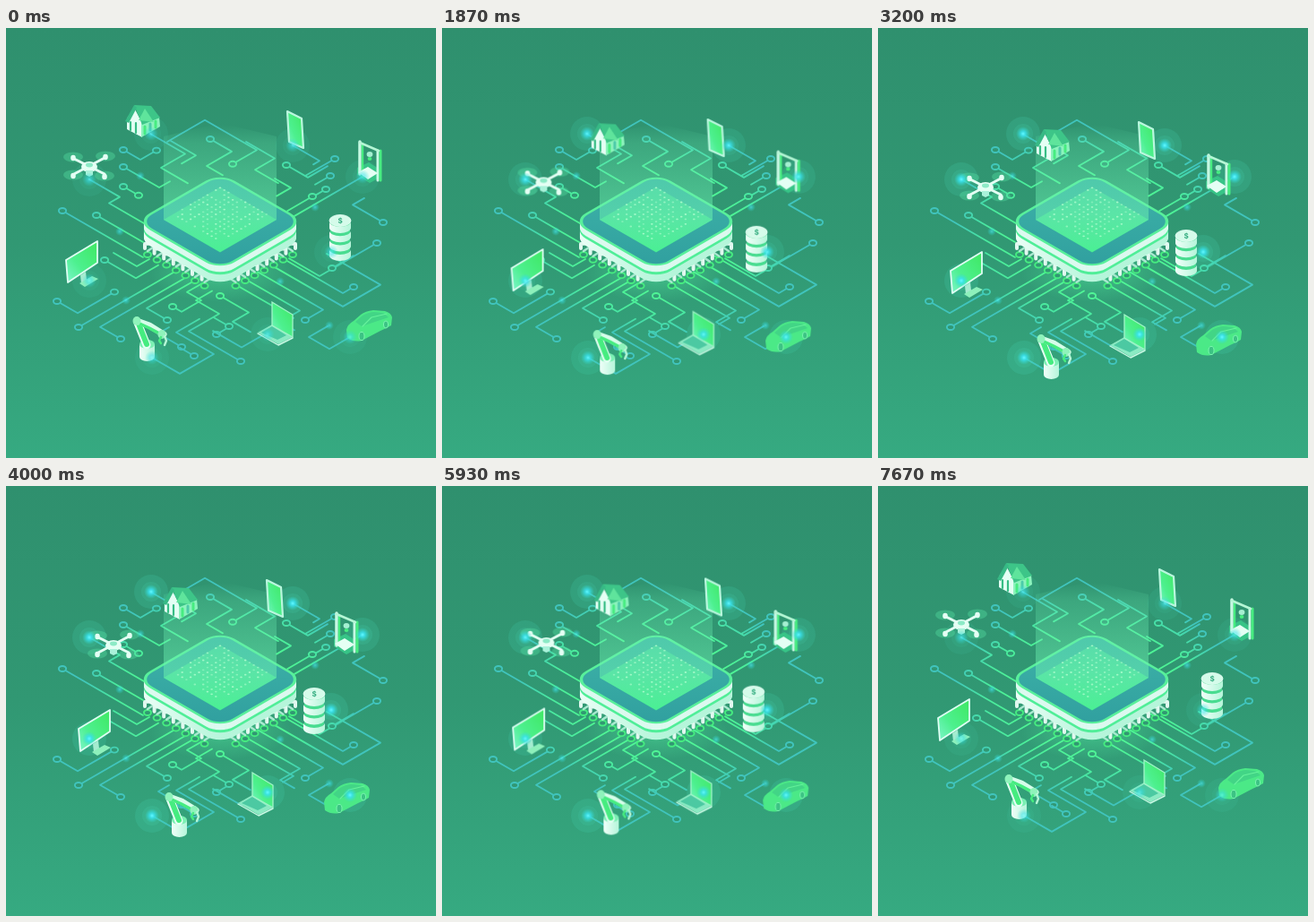
Write an HTML page that moves like this. It is 480 px wide and 480 px high and loops after 7740 ms.

```html
<!DOCTYPE html>
<html lang="en">
<head>
<meta charset="utf-8">
<title>Connected devices</title>
<style>
html, body { margin: 0; width: 100%; height: 100%; overflow: hidden; background: #319873; }
svg { display: block; width: 100vw; height: 100vh; }
.device, .pulse { animation: 7740ms infinite cubic-bezier(.37, 0, .63, 1); }
.device { animation-name: approach; }
.pulse { animation-name: pulse; }
@keyframes approach {
  0%, 12.92% { transform: translate(0, 0); }
  29.72%, 72.66% { transform: translate(var(--dx), var(--dy)); }
  89.46%, 100% { transform: translate(0, 0); }
}
@keyframes pulse {
  0%, 12.92% { opacity: .6; }
  29.72%, 72.66% { opacity: 1; }
  89.46%, 100% { opacity: .6; }
}
</style>
</head>
<body>
<svg id="stage" viewBox="0 0 480 480" preserveAspectRatio="none">
  <defs>
    <linearGradient id="sky" x2="0" y2="1">
      <stop stop-color="#2f906e"/><stop offset=".5" stop-color="#319873"/><stop offset="1" stop-color="#36aa81"/>
    </linearGradient>
    <radialGradient id="wire" gradientUnits="userSpaceOnUse" cx="0" cy="0" r="190" gradientTransform="translate(239 232) scale(1 .74)">
      <stop offset=".45" stop-color="#4ef593"/><stop offset=".62" stop-color="#4aea9f"/><stop offset=".82" stop-color="#40c4bd"/>
    </radialGradient>
    <linearGradient id="green" x1="0" y1="1" x2="1" y2="0">
      <stop stop-color="#7df5cc"/><stop offset=".4" stop-color="#4df08f"/><stop offset="1" stop-color="#3fe862"/>
    </linearGradient>
    <linearGradient id="white">
      <stop stop-color="#f0fff9"/><stop offset="1" stop-color="#b5f5da"/>
    </linearGradient>
    <linearGradient id="face" x2="1" y2="1">
      <stop stop-color="#3fb4a8"/><stop offset="1" stop-color="#309f9f"/>
    </linearGradient>
    <linearGradient id="screen" x2="1" y2="1">
      <stop stop-color="#52dca4"/><stop offset="1" stop-color="#48fa8c"/>
    </linearGradient>
    <linearGradient id="beam" gradientUnits="userSpaceOnUse" x1="0" y1="108" x2="0" y2="250">
      <stop stop-color="#6df0b4" stop-opacity="0"/><stop offset=".14" stop-color="#6df0b4" stop-opacity=".2"/>
      <stop offset=".7" stop-color="#6cf2b0" stop-opacity=".52"/><stop offset="1" stop-color="#50fa95" stop-opacity=".6"/>
    </linearGradient>
    <radialGradient id="spark">
      <stop stop-color="#62f8ff"/><stop offset=".35" stop-color="#38e0ec" stop-opacity=".85"/>
      <stop offset="1" stop-color="#35dcd0" stop-opacity="0"/>
    </radialGradient>
    <radialGradient id="glow">
      <stop stop-color="#5cffab" stop-opacity=".4"/><stop offset="1" stop-color="#5cffab" stop-opacity="0"/>
    </radialGradient>
  </defs>
  <rect width="480" height="480" fill="url(#sky)"/>
</svg>
<script>
const stage = document.getElementById('stage');
const MINT = '#e4fff4', LEAF = '#46ec80', SHADE = '#36bd84';

const poly = (points, fill, extra = '') => `<polygon points="${points}" fill="${fill}" ${extra}/>`;
const line = (points, color, width) =>
  `<polyline points="${points}" fill="none" stroke="${color}" stroke-width="${width}" stroke-linejoin="round" stroke-linecap="round"/>`;
const oval = (x, y, rx, ry, fill, extra = '') =>
  `<ellipse cx="${x}" cy="${y}" rx="${rx}" ry="${ry}" fill="${fill}" ${extra}/>`;
const ring = (x, y) => oval(x, y, 4.1, 3, '#319773', 'stroke="url(#wire)" stroke-width="1.9"');
const spark = (x, y, r, alpha = 1) => oval(x, y, r, r, 'url(#spark)', `opacity="${alpha}"`);

// Isometric traces: start point, then compass moves by horizontal distance.
// A leading "o" puts a ring on the start, a trailing "o" puts one on the end.
const COMPASS = { e: [1, -1], s: [1, 1], w: [-1, 1], n: [-1, -1] };
const SLOPE = .577;
function trace(route) {
  const [head, ...moves] = route.split(' ');
  let [x, y] = head.replace('o', '').split(',').map(Number);
  const points = [[x, y]];
  let rings = head[0] === 'o' ? ring(x, y) : '';
  for (const move of moves) {
    if (move === 'o') { rings += ring(x, y); continue; }
    const [sx, sy] = COMPASS[move[0]], length = +move.slice(1);
    x += sx * length;
    y += sy * length * SLOPE;
    points.push([x, y]);
  }
  return line(points.join(' '), 'url(#wire)', 1.8) + rings;
}

const topRoutes = [
  'o131,136 s19 e18 o', '161,118 s39 w27 s30', 'o228,124 s24 w28 s18',
  '180,127 e42 s58 w27 o', '184,126 s28 w16', '268,127 s32 w22 s26',
  'o313,153 s24 e22', '320,131 s30 w7', 'o367,146 w33', '300,168 s18 w16',
  'o362,165 w17', 'o357,180 w18', 'o342,188 w28', '398,166 w76',
  'o421,217 n34 e13'
];
const leftRoutes = [
  'o131,155 s40 e12', 'o131,177 s17 o', '93,169 s34 w12 s45',
  'o63,204 s90', 'o101,209 s52', 'o110,259 s35 e25', '120,251 s26 e14',
  'o57,305 s23 e41 o', 'o81,334 e110', 'o128,347 n23 e97', 'o180,326 n23 e56'
];
const rightRoutes = [
  'o414,240 w64 n34', 'o364,268 e24', '358,252 s60 w42 n78',
  'o388,289 w12 n73', 'o334,326 e20 n73', '384,345 w23 n23 e21'
];
const bottomRoutes = [
  'o186,311 s10 e22 n16 e18', 'o262,372 n58 e34 n26 e18',
  'o235,342 e15', 'o249,333 n17', 'o196,356 n26 e12', 'o210,366 n16',
  '163,368 s31 e38 n42 e26', 'o239,299 s32 w18 s20', '290,341 w27 n32',
  '259,288 s62 w12', '270,282 s58 w22 s16'
];
const wires = [...topRoutes, ...leftRoutes, ...rightRoutes, ...bottomRoutes].map(trace).join('');

const isoSquare = (y, half, radius, fill, extra = '') =>
  `<rect transform="matrix(.866 .5 -.866 .5 239 ${y})" x="${-half}" y="${-half}" width="${2 * half}" height="${2 * half}" rx="${radius}" fill="${fill}" ${extra}/>`;

function chip() {
  let out = oval(239, 272, 80, 34, 'url(#glow)');
  for (let i = 0; i < 7; i++) {
    for (const side of [-1, 1]) {
      const x = 239 + side * (81 - 10.6 * i), y = 253 + 5.8 * i;
      const at = (dx, dy) => `${x - side * dx},${y + dy}`;
      out += oval(x, y, 4, 3, '#319773', `stroke="${LEAF}" stroke-width="2"`);
      out += line(`${at(9, -13)} ${at(-3, -12)} ${at(-3, -7)}`, '#e2f8f0', 4);
      out += line(`${at(6, -8)} ${at(0, -4)}`, '#a8e8cf', 2.5);
    }
  }
  for (let dy = 18; dy > 0; dy--) {
    const color = dy > 10 ? 'url(#white)' : dy > 7 ? '#50ee98' : '#dcf9ef';
    out += isoSquare(216 + dy, 54.4, 18, color);
  }
  out += isoSquare(216, 53.2, 17, 'url(#face)', 'stroke="#58f09b" stroke-width="2.8"');
  out += isoSquare(214, 36.4, 0, 'url(#screen)', 'opacity=".7"');
  out += poly('176,121 239,106 302,121 302,214 239,250 176,214', 'url(#beam)');
  for (let u = -6; u <= 5; u++) {
    for (let v = -6; v <= 5; v++) {
      const noise = Math.abs(Math.sin(u * 12.99 + v * 78.23) * 43758.5) % 1;
      if (noise < .22) continue;
      const x = 239 + (u - v) * 4.7, y = 208 + (u + v + 1) * 2.7;
      out += oval(x, y, 1.3, .9, '#b8ffd2', `opacity="${.25 + noise * .55}"`);
    }
  }
  return out;
}

const house = () =>
  poly('135,101 143,89 152,106 152,122 135,113', MINT) +
  poly('151,106 171,99 172,110 151,122', '#8cf3bd') +
  poly('143,86 162,87 172,100 152,108', '#3dc588') +
  poly('133,104 143,86 146,89 137,106', '#37b985') +
  poly('148,103 155,90 165,105', '#5fe49c') +
  line('139,105 139,114', SHADE, 2.2) + line('145,106 145,117', SHADE, 2.2) +
  line('155,110 155,118', LEAF, 3) + line('161,107 161,114', '#4ccba9', 3) + line('167,104 167,111', LEAF, 3);

function drone() {
  const rotors = [[75, 144], [111, 143], [75, 164], [110, 165]];
  return rotors.map(([x, y]) => oval(x, y, 11, 5.5, '#55dfa2', 'opacity=".4"')).join('') +
    line('76,146 110,163', MINT, 3) + line('110,145 76,163', MINT, 3) +
    rotors.map(([x, y]) => oval(x, y + 1, 2.8, 3.2, MINT)).join('') +
    oval(93, 155, 9, 6, MINT) + oval(93, 153, 4, 2.4, '#8ceac6') +
    poly('89,159 97,159 97,164 93,166 89,164', '#a9f2da');
}

const monitor = () =>
  poly('83,276 89,272 90,281 84,285', '#a4ecd0') +
  poly('82,285 96,277 103,280 88,289', '#8df0bb') +
  poly('67,259 102,238 102,262 69,284', 'url(#green)', 'stroke="#dffff4" stroke-width="1.8" stroke-linejoin="round"');

const phone = () =>
  poly('314,93 330,101 332,134 316,127', 'url(#green)', 'stroke="#b9f7de" stroke-width="2.2" stroke-linejoin="round"');

const printer = () =>
  poly('392,156 405,150 419,159 419,166 406,173 392,164', '#37c487') +
  line('395,127 395,163', '#c7f8e3', 3.5) + line('415,137 415,170', '#c7f8e3', 3) +
  line('398,129 398,162', LEAF, 2.4) + line('418,137 418,170', LEAF, 3) +
  line('395,128 416,137', '#b5f6d5', 2.6) +
  poly('393,161 404,155 415,162 404,169', MINT) +
  oval(406, 141, 3.4, 3, '#a5efd1') + oval(406, 146, 2.4, 2, LEAF);

function coins() {
  let out = '<path d="M362 216v32a11 6 0 0 0 22 0v-32z" fill="#48dc90"/>';
  for (let row = 3; row >= 0; row--) {
    const y = 216 + row * 10.3;
    out += `<path d="M361 ${y}a12 6 0 0 0 24 0v7a12 6 0 0 1 -24 0z" fill="url(#white)"/>`;
  }
  out += oval(373, 215, 12, 6.5, '#d5fbea', 'stroke="#e9fff6" stroke-width=".8"');
  return out + '<text x="373" y="218" text-anchor="middle" font-family="Inter, sans-serif" font-weight="700" font-size="8" fill="#35ad80">$</text>';
}

const car = () =>
  '<path d="M380 337Q381 331 388 327L396 320Q401 316 410 315L423 316Q430 318 431 323L430 332Q425 335 418 338L397 349Q388 351 381 346Z" fill="#4be987"/>' +
  '<path d="M390 328L398 321Q405 317 411 317L421 318L427 323L409 329L397 333Z" fill="#42d586"/>' +
  line('398,333 408,323 425,319', '#66f29c', 1.2) +
  oval(397, 344, 3, 4.6, '#3cc384', 'stroke="#78f5ae" stroke-width="1"') +
  oval(424, 331, 2.6, 4, '#3cc384', 'stroke="#78f5ae" stroke-width="1"');

const laptop = () =>
  poly('281,340 297,331 320,345 304,353', '#8beac3') +
  poly('285,340 297,333 313,343 303,348', '#4cc9a2') +
  poly('297,306 320,320 320,345 297,332', 'url(#green)', 'stroke="#a0f5c8" stroke-width="1.3"') +
  line('281,341 304,354 320,346', '#c9f9e4', 1.4);

const robot = () =>
  '<path d="M149 353v14a8.5 5 0 0 0 17 0v-14z" fill="url(#white)"/>' +
  oval(157.5, 353, 8.5, 5, '#7cf0b4') +
  line('157,354 147,329', MINT, 9) + line('157,353 148,330', LEAF, 6) +
  line('146,327 160,332 176,342', '#d6fdea', 7) + line('147,329 160,335 173,342', LEAF, 3.5) +
  oval(146, 327, 4.5, 5, '#8ff3bb') + oval(174, 342, 4.5, 5, '#8ff3bb') +
  line('177,344 179,349 177,354', '#b5f7d6', 2.4) + line('173,345 171,349 173,352', LEAF, 2.4);

const devices = [
  { draw: house, dx: 42, dy: 27, node: [162, 118] },
  { draw: drone, dx: 27, dy: 23, node: [93, 169] },
  { draw: monitor, dx: 14, dy: 12, node: [93, 282] },
  { draw: phone, dx: -23, dy: 12, node: [320, 131] },
  { draw: printer, dx: -26, dy: 15, node: [398, 166] },
  { draw: coins, dx: -29, dy: 17, node: [363, 250] },
  { draw: car, dx: -25, dy: 16, node: [384, 345] },
  { draw: laptop, dx: -22, dy: 14, node: [292, 342] },
  { draw: robot, dx: 36, dy: 20, node: [163, 368] }
];

const group = (name, content, style = '') => `<g class="${name}" style="${style}">${content}</g>`;
const halos = devices.map(({ node: [x, y] }) =>
  oval(x, y, 19, 19, '#4ce0bd', 'opacity=".16"') + oval(x, y, 11, 11, '#4ce0bd', 'opacity=".14"')).join('');
const cores = devices.map(({ node: [x, y] }) => spark(x, y, 8)).join('');
const glints = [[150, 165], [127, 227], [345, 200], [306, 283], [134, 304], [361, 332]]
  .map(([x, y]) => spark(x, y, 5, .55)).join('');

stage.insertAdjacentHTML('beforeend',
  wires + glints + chip() + group('pulse', halos) +
  devices.map(({ draw, dx, dy }) => group('device', draw(), `--dx:${dx}px;--dy:${dy}px`)).join('') +
  group('pulse', cores));
</script>
</body>
</html>
```
